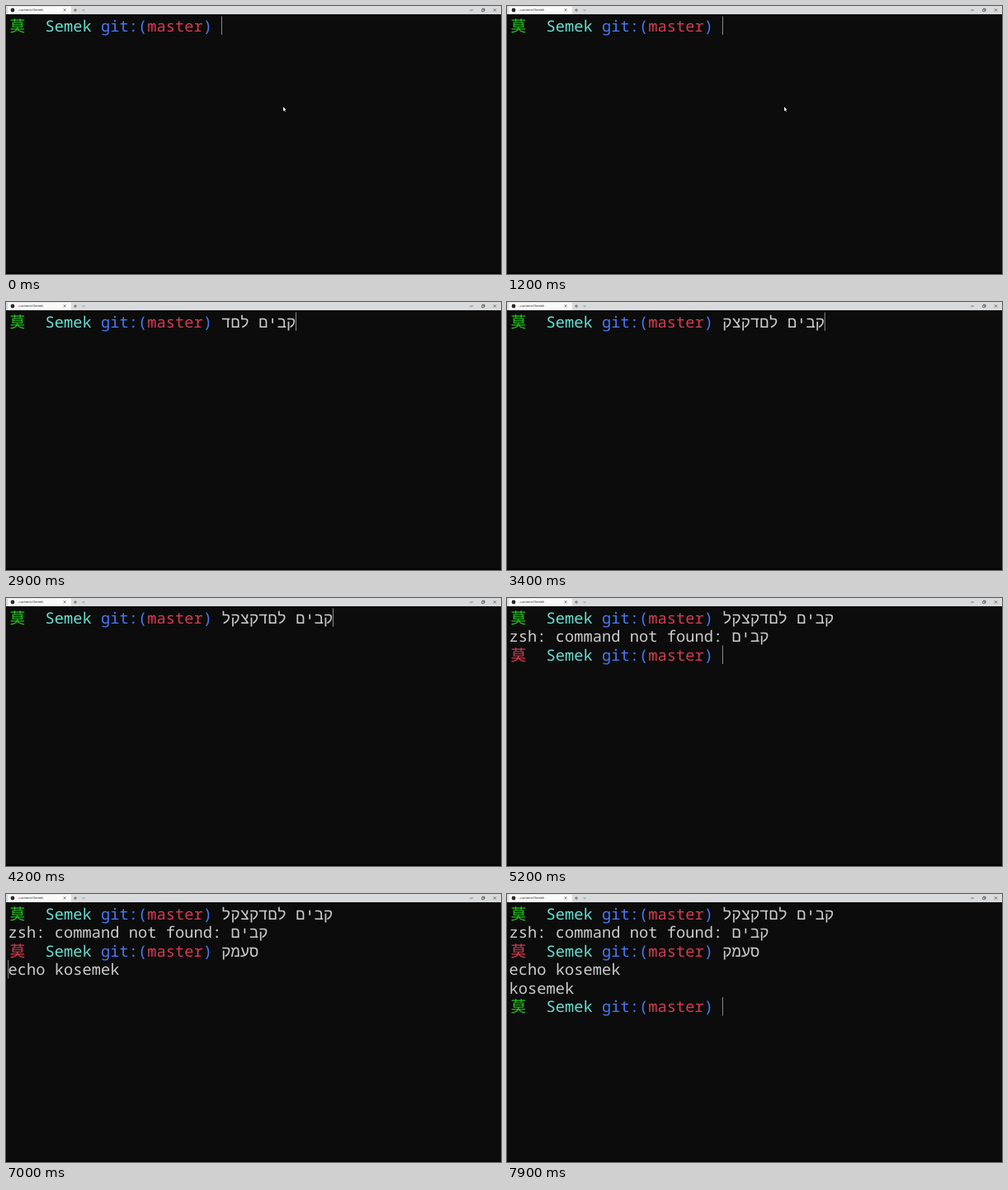
Write an HTML page that moves like this. It is 600 px wide and 325 px high and loops after 8000 ms.

```html
<!DOCTYPE html>
<html lang="en">
<head>
<meta charset="utf-8">
<title>Terminal</title>
<style>
html, body { margin: 0; width: 100%; height: 100%; overflow: hidden; background: #0c0c0c; }
svg { display: block; width: 100vw; height: 100vh; }
text { white-space: pre; text-rendering: geometricPrecision; }
.term { font: 500 18.75px "Noto Sans Mono", "DejaVu Sans Mono", monospace; }
.hebrew { font: 18.75px "Liberation Mono", "DejaVu Sans", monospace; }
.cjk { font: 18.75px "Noto Sans CJK SC", "Noto Sans CJK JP", "Noto Sans CJK", sans-serif; }
.title { font: 3.9px "Open Sans", "Noto Sans", sans-serif; }
</style>
</head>
<body>
<svg viewBox="0 0 600 325" xmlns="http://www.w3.org/2000/svg">
  <rect width="600" height="325" fill="#0c0c0c"/>
  <rect y="323" width="600" height="2" fill="#030303"/>
  <rect width="600" height="10" fill="#d9dadb"/>
  <rect x="2.5" y="0.5" width="76.5" height="9.5" fill="#f9f9f9"/>
  <circle cx="8" cy="5" r="2.4" fill="#2b2822"/>
  <text class="title" x="14" y="6.4" fill="#222">..cuments/Semek</text>
  <g fill="none" stroke="#333" stroke-width="0.6">
    <path d="M69.7 3.4l3 3m0-3l-3 3M82 5h4M84 3v4M92.8 4.4l1.2 1.2 1.2-1.2"/>
    <path d="M562.3 5h3.6M576.7 4h2.6v2.6h-2.6zM577.5 4v-.8h2.6v2.6h-.8M590.8 3.2l3.4 3.4m0-3.4l-3.4 3.4"/>
  </g>
  <g id="screen"></g>
  <rect id="caret" width="1" height="22.5" fill="#8a8a8a"/>
  <path id="pointer" d="M336.1 122.2v5.2l1.1-1 .8 1.7.8-.4-.8-1.6h1.5z" fill="#fff"/>
</svg>
<script>
const LOOP = 8000, CELL = 11.25, ROW = 22.5, LEFT = 2.5, TOP = 12.5;
const PROMPT_COLS = 23;
const GREEN = "#1fc817", RED = "#d53b53", CYAN = "#66e0d3", BLUE = "#4779f7", GREY = "#cccccc";
const byId = id => document.getElementById(id);
const screen = byId("screen"), caret = byId("caret"), pointer = byId("pointer");
const colX = col => LEFT + col * CELL;

function addText(parent, row, col, content, fill, font = "term") {
  const el = document.createElementNS(screen.namespaceURI, "text");
  el.setAttribute("class", font);
  el.setAttribute("x", colX(col) + (font === "cjk" ? 1.9 : 0));
  el.setAttribute("y", TOP + row * ROW + 18);
  el.setAttribute("fill", fill);
  el.textContent = content;
  parent.append(el);
  return el;
}

function addGroup(from) {
  const group = document.createElementNS(screen.namespaceURI, "g");
  screen.append(group);
  timed.push({ group, from });
  return group;
}

function addPrompt(row, from, color) {
  const group = addGroup(from);
  addText(group, row, 0, "莫", color, "cjk");
  addText(group, row, 4, "Semek", CYAN);
  addText(group, row, 10, "git:(", BLUE);
  addText(group, row, 15, "master", RED);
  addText(group, row, 21, ")", BLUE);
}

// Each command holds the moment of every key press.
const timed = [];
const commands = [
  { row: 0, start: 0, value: "קבים לםדקצקל",
    keys: [1300, 1500, 1700, 1900, 2200, 2400, 2600, 2850, 3050, 3200, 3350, 3500] },
  { row: 2, start: 4300, value: "סעמק", keys: [5650, 5850, 6050, 6250] }
];
// Caret rests outside a command line: [from, row, column].
const rests = [[6650, 3, 0], [7050, 5, PROMPT_COLS]];

addPrompt(0, 0, GREEN);
addPrompt(2, 4300, RED);
addPrompt(5, 7050, GREEN);

const failure = addGroup(4300);
addText(failure, 1, 0, "zsh: command not found:", GREY);
addText(failure, 1, 24, "קבים", GREY, "hebrew");
addText(addGroup(6850), 3, 0, "echo kosemek", GREY);
addText(addGroup(7050), 4, 0, "kosemek", GREY);

for (const command of commands)
  command.el = addText(screen, command.row, PROMPT_COLS, "", GREY, "hebrew");

function render(t) {
  let row = 0, col = PROMPT_COLS;
  for (const { group, from } of timed)
    group.setAttribute("visibility", t >= from ? "visible" : "hidden");
  for (const command of commands) {
    const count = command.keys.filter(key => t >= key).length;
    const typed = command.value.slice(0, count);
    if (command.el.textContent !== typed) command.el.textContent = typed;
    if (t >= command.start) [row, col] = [command.row, PROMPT_COLS + count];
  }
  for (const rest of rests)
    if (t >= rest[0]) [, row, col] = rest;
  caret.setAttribute("x", colX(col) - 0.25);
  caret.setAttribute("y", TOP + row * ROW);
  pointer.setAttribute("visibility", t < commands[0].keys[0] ? "visible" : "hidden");
}

const origin = performance.now();
function tick() {
  render((performance.now() - origin) % LOOP);
  requestAnimationFrame(tick);
}
tick();
</script>
</body>
</html>
```
